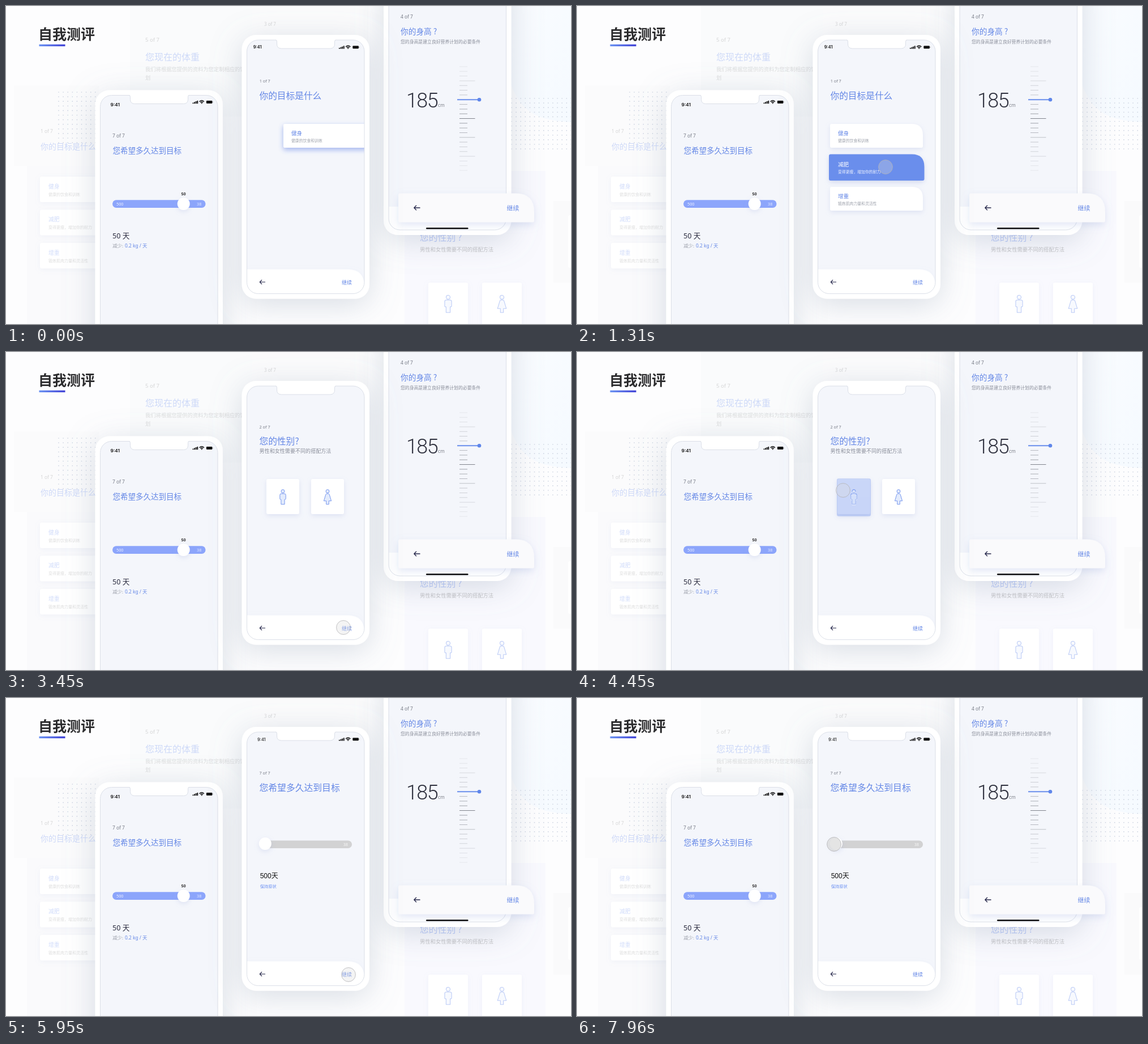
Recreate the animation shown at these times as an HTML page. Size 998 px wide and 561 px high, loop 8 s.

```html
<!DOCTYPE html>
<html lang="zh-CN">
<head>
<meta charset="utf-8">
<title>自我测评</title>
<style>
html, body { margin: 0; width: 100%; height: 100%; overflow: hidden; background: #fdfdfe; }
svg { display: block; width: 100vw; height: 100vh; }
text { font-family: "Noto Sans", "Noto Sans CJK SC", "Noto Sans CJK", sans-serif; white-space: pre; }
.cjk { font-family: "Noto Sans CJK SC", "Noto Sans CJK", "Noto Sans", sans-serif; font-weight: 300; }
.thin { font-weight: 300; }
.bar { font-family: Inter, sans-serif; }
.num { font-family: Roboto, sans-serif; font-weight: 300; }
.arial { font-family: "Liberation Sans", "Noto Sans CJK SC", "Noto Sans CJK", sans-serif; }
</style>
</head>
<body>
<svg id="stage" viewBox="0 0 998 561" preserveAspectRatio="none"></svg>
<script>
const LOOP = 8000;
const BLUE = '#6487e6', PICK = '#6a8eec', GREY = '#9ea2ac', DARK = '#2c2d40', PALE = '#f4f6fb', EDGE = '#d3d8e2';

// ---------- drawing helpers ----------
const txt = (x, cy, size, str, fill, cls = 'cjk', more = '') =>
  `<text class="${cls}" x="${x}" y="${cy + size * (cls === 'cjk' ? 0.38 : 0.36)}" font-size="${size}" fill="${fill}" ${more}>${str}</text>`;
const rect = (x, y, w, h, r, fill, more = '') =>
  `<rect x="${x}" y="${y}" width="${w}" height="${h}" rx="${r}" fill="${fill}" ${more}/>`;
const circle = (x, y, r, fill, more = '') =>
  `<circle cx="${x}" cy="${y}" r="${r}" fill="${fill}" ${more}/>`;
const line = (x1, x2, y, color, w, more = '') =>
  `<path d="M${x1} ${y}H${x2}" stroke="${color}" stroke-width="${w}" ${more}/>`;
const group = (body, more = '') => `<g ${more}>${body}</g>`;

// small corners with one large corner at top right
const leaf = (x, y, w, h, big, r = 3) =>
  `M${x + r} ${y}H${x + w - big}Q${x + w} ${y} ${x + w} ${y + big}V${y + h - r}` +
  `Q${x + w} ${y + h} ${x + w - r} ${y + h}H${x + r}Q${x} ${y + h} ${x} ${y + h - r}V${y + r}Q${x} ${y} ${x + r} ${y}Z`;

function dots(x, y, cols, rows) {
  let d = '';
  for (let j = 0; j < rows; j++)
    for (let i = 0; i < cols; i++) d += `M${(x + i * 8.1).toFixed(1)} ${(y + j * 8.1).toFixed(1)}h0`;
  return `<path d="${d}" stroke="#ccd3e0" stroke-width="1.7" stroke-linecap="round"/>`;
}

const arrow = (x, y, s = 1) =>
  `<path transform="translate(${x} ${y}) scale(${s})" d="M10 0H0.5M4 -3.8L0.3 0L4 3.8" fill="none" stroke="#25264a" stroke-width="1.2"/>`;

function signals(x, y) {
  let s = '';
  for (let i = 0; i < 4; i++) s += rect(x + i * 2.6, y + 1.2 - i * 1.2, 1.9, 1.8 + i * 1.2, 0.4, '#111');
  s += `<path d="M${x + 12} ${y - 0.6}q4.2 -3.8 8.4 0M${x + 13.8} ${y + 1}q2.4 -2.2 4.8 0" fill="none" stroke="#111" stroke-width="1.4"/>`;
  s += circle(x + 16.2, y + 2.2, 1, '#111');
  return s + rect(x + 24.3, y - 2.4, 10.6, 5, 1.2, '#111') + rect(x + 35.4, y - 0.8, 0.9, 1.8, 0.4, '#888');
}

function phone(x, y, h, body, id) {
  const nx = x + 62;
  return rect(x, y, 225.5, h, 25, '#fff', 'filter="url(#glow)"') +
    rect(x + 9, y + 9, 207.5, h - 18, 20, PALE) +
    group(body, `clip-path="url(#${id})"`) +
    rect(x + 9, y + 9, 207.5, h - 18, 20, 'none', `stroke="${EDGE}" stroke-width=".8"`) +
    `<path d="M${nx - 2} ${y + 8}q2 1 2 4v4q0 8 8 8h86q8 0 8 -8v-4q0 -3 2 -4z" fill="#fff"/>` +
    `<path d="M${nx - 2} ${y + 9}q2 0 2 3v4q0 8 8 8h86q8 0 8 -8v-4q0 -3 2 -3" fill="none" stroke="${EDGE}" stroke-width=".8"/>`;
}
const clip = (id, x, y, h) =>
  `<clipPath id="${id}">${rect(x + 9, y + 9, 207.5, h - 18, 20, '#fff')}</clipPath>`;
const shadow = (id, dy, dev, color, op) =>
  `<filter id="${id}" x="-50%" y="-50%" width="200%" height="200%"><feDropShadow dx="0" dy="${dy}" stdDeviation="${dev}" flood-color="${color}" flood-opacity="${op}"/></filter>`;

const HIS = 'M-3 -5.7H3Q5.2 -5.7 5.2 -3.4V3.2Q5.2 4.6 3.1 4.6V13H-3.1V4.6Q-5.2 4.6 -5.2 3.2V-3.4Q-5.2 -5.7 -3 -5.7Z';
const HER = 'M-1.6 -5.7H1.6Q2.8 -5.7 3.3 -4L6.6 7H2.3V13H-2.3V7H-6.6L-3.3 -4Q-2.8 -5.7 -1.6 -5.7Z';
const person = (x, y, body, color, tint, s = 1, more = '') =>
  group(circle(0, -10, 3, tint) + `<path d="${body}" fill="${tint}"/>`,
    `transform="translate(${x} ${y}) scale(${s})" stroke="${color}" stroke-width=".9" stroke-linejoin="round" ${more}`);

// ---------- goal cards ----------
const GOALS = [
  ['健身', '健康的饮食和训练', 208],
  ['减肥', '变得更瘦，增加你的耐力', 263.5],
  ['增重', '锻炼肌肉力量和灵活性', 319]
];
const label = (x, y, [a, b], c1, c2) => txt(x, y + 16, 9.6, a, c1) + txt(x, y + 29, 6.85, b, c2);

// ---------- backdrop ----------
function backdrop() {
  let s = rect(14, 140, 150, 142, 0, '#fbfbfc') + rect(37, 282, 250, 290, 0, '#fafafc') +
    rect(219, -5, 215, 200, 0, '#fafbfc') + rect(434, -5, 206, 90, 0, '#fbfbfc') +
    rect(704, 291, 249, 280, 0, '#f9f9fe') + rect(967, 344, 40, 144, 0, '#fafafb') + rect(993, 369, 20, 93, 3, '#fff');
  s += `<path d="M893 -5H1000V205Q940 203 918 180Q900 166 885 120Z" fill="url(#sky)"/>`;
  s += dots(93, 152, 9, 12) + dots(893, 163, 14, 12);
  let g = txt(61, 221, 8.4, '1 of 7', '#777', '') + txt(61, 248, 14, '你的目标是什么', '#5d83ee');
  g += txt(246, 60, 9.5, '5 of 7', '#777', '') + txt(246, 90, 16, '您现在的体重', '#5d83ee') +
    txt(246, 111, 9.3, '我们将根据您提供的资料为您定制相应的饮食计', '#888') + txt(246, 126, 9.3, '划', '#888');
  g += txt(456, 32, 8, '3 of 7', '#777', '');
  s += group(g, 'opacity=".28"');
  GOALS.forEach((c, i) => {
    const y = 301 + i * 58.5;
    s += `<path d="${leaf(60, y, 170, 45, 20)}" fill="#fff" filter="url(#faint)"/>` +
      group(txt(75, y + 17, 9.8, c[0], '#5d83ee') + txt(75, y + 31, 7, c[1], '#888'), 'opacity=".28"');
  });
  s += group(txt(731, 408, 15.8, '您的性别 ?', '#5d83ee') + txt(731, 429, 9.3, '男性和女性需要不同的搭配方法', '#777'), 'opacity=".42"');
  for (const x of [746, 841]) s += rect(x, 488, 70, 90, 3, '#fff', 'filter="url(#faint)"');
  s += person(781, 525.5, HIS, '#8fa9f0', '#f3f6fe', 1.17, 'opacity=".6"') + person(876, 525.5, HER, '#8fa9f0', '#f3f6fe', 1.17, 'opacity=".6"');
  return s;
}

const heading = () => txt(57, 49.8, 25, '自我测评', '#2b2b2d', 'cjk', 'style="font-weight:700"') +
  rect(58.5, 67.7, 46, 3.4, 0, 'url(#under)');

const knob = (x, y) => circle(x, y, 11, '#fff', 'filter="url(#soft)"');

function leftPhone() {
  return phone(157.5, 148.5, 470,
    txt(184.5, 173.7, 8.2, '9:41', '#111', 'bar', 'font-weight="600"') + signals(329.5, 169.3) +
    txt(188, 229.5, 8.3, '7 of 7', '#777b86', '') +
    txt(188.5, 255, 13.5, '您希望多久达到目标', BLUE) +
    rect(188, 342.3, 164.5, 13.6, 6.8, '#8ca5fb') +
    txt(195, 349, 7.3, '500', '#eef2ff', '') + txt(337, 349, 7.3, '38', '#dfe6ff', '') +
    knob(313.7, 349) + txt(309.4, 331, 7.2, '50', '#333', '', 'font-weight="600"') +
    txt(188, 405, 12.6, '50 天', DARK, 'thin') +
    txt(188, 423.3, 8.4, '减少:', GREY) + txt(210, 423.3, 8.4, '0.2 kg / 天', BLUE, ''), 'clipL');
}

function rightPhone() {
  let ticks = '';
  for (let i = 0; i < 23; i++) {
    if (i === 7) continue;
    const long = i % 4 === 3, k = Math.abs(i - 11) / 11;
    ticks += line(801, long ? 828.5 : 815, (107 + i * 8.32).toFixed(1), '#4a4d58', 0.8, `opacity="${(0.85 - 0.75 * Math.sqrt(k)).toFixed(2)}"`);
  }
  const inside = txt(697, 19.5, 8.3, '4 of 7', '#777b86', '') +
    txt(697, 45, 13.7, '你的身高 ?', BLUE) +
    txt(697, 62.7, 7.85, '您的身高是建立良好营养计划的必要条件', '#8a8e9a') +
    txt(707, 166, 36, '185', '#30323f', 'num', 'letter-spacing="-1.6"') + txt(763, 174.5, 8.4, 'cm', '#7d808a', 'thin') +
    ticks + line(797, 836, 165.2, PICK, 1.9) + circle(836, 165.2, 3.3, '#5f86ea') +
    `<path d="${leaf(675, 354, 208, 50, 28, 0)}" fill="#fff"/>`;
  return phone(667, -62, 466, inside, 'clipR') +
    `<path d="${leaf(693, 330.5, 240, 51, 33)}" fill="#fafafc" filter="url(#float)"/>` +
    rect(742, 391, 74.5, 2.5, 1.2, '#0b0b0d') +
    arrow(720.5, 356, 1.1) + txt(884.5, 356.5, 11, '继续', BLUE, 'cjk', 'style="font-weight:400"');
}

function midPhone() {
  let one = txt(436.7, 72.7, 7.4, '9:41', '#111', 'bar', 'font-weight="600"') + signals(588, 72.6) +
    txt(447.7, 132, 7.3, '1 of 7', '#777b86', '') + txt(447.5, 157.8, 15.7, '你的目标是什么', BLUE);
  GOALS.forEach((c, i) => {
    const d = leaf(447, c[2], 164, 42, 20);
    let card = `<path d="${d}" fill="#fff" filter="url(#lift)" id="lift${i}"/><path d="${d}" fill="#fff" filter="url(#soft)"/>` +
      label(461, c[2], c, BLUE, GREY);
    if (i === 1) card += group(`<path d="${leaf(445, 261.5, 168.5, 46.5, 22)}" fill="${PICK}" filter="url(#soft)"/>` +
      label(461, c[2], c, '#fff', '#f3f6ff'), 'id="goalOn" opacity="0"');
    one += group(card, `id="goal${i}"`);
  });
  const two = txt(447.5, 132, 7.3, '2 of 7', '#777b86', '') + txt(447.5, 157.5, 15.7, '您的性别?', BLUE) +
    txt(447.5, 174.5, 9.07, '男性和女性需要不同的搭配方法', '#8a8e9a') +
    rect(460, 224, 58, 62, 3, '#fff', 'filter="url(#soft)"') + rect(539, 224, 58, 62, 3, '#fff', 'filter="url(#soft)"') +
    person(489, 255.7, HIS, PICK, '#e3ebfc') + person(568, 255.7, HER, PICK, '#e3ebfc') +
    group(rect(459, 223.3, 60, 66.5, 3, PICK, 'filter="url(#soft)"') +
      person(489, 257, HIS, '#fff', '#b9caf7', 0.97), 'id="sexOn" opacity="0"');
  const three = txt(444, 73, 7.4, '9:41', '#222', 'bar', 'font-weight="500"') + signals(588, 72.6) +
    txt(447.5, 132, 7.3, '7 of 7', '#777b86', '') + txt(447.5, 157.8, 15.8, '您希望多久达到目标', BLUE) +
    rect(448, 251.6, 163, 13.4, 6.7, '#d2d2d3') + txt(596, 258.5, 6.8, '38', '#f7f7f7', '') +
    knob(457.8, 257) + txt(448.7, 314, 12, '500天', '#111', 'arial') + txt(448.7, 332.5, 7.25, '保持原状', '#6b90f2');
  const inside = group(one, 'id="s0"') + group(two, 'id="s1"') + group(three, 'id="s2"') +
    `<path d="${leaf(424, 464.5, 209, 50, 30, 0)}" fill="#fff" filter="url(#faint)"/>` +
    arrow(448, 487) + txt(593, 487.5, 9, '继续', BLUE, 'cjk', 'style="font-weight:400"');
  return phone(416.5, 51, 465.5, inside, 'clipM');
}

document.getElementById('stage').innerHTML = `<defs>
  ${shadow('glow', 10, 27, '#8292a8', 0.3)}${shadow('soft', 3, 4, '#8c9fd6', 0.22)}${shadow('lift', 4, 5, '#6d8df0', 0.5)}
  ${shadow('faint', 2, 5, '#9aa8cc', 0.1)}${shadow('float', 5, 7, '#8fa2da', 0.26)}
  ${clip('clipL', 157.5, 148.5, 470)}${clip('clipM', 416.5, 51, 465.5)}${clip('clipR', 667, -62, 466)}
  <linearGradient id="under"><stop stop-color="#6a92f2"/><stop offset="1" stop-color="#4243d6"/></linearGradient>
  <linearGradient id="sky" x2="1" y2="1"><stop stop-color="#fafcff"/><stop offset="1" stop-color="#f5faff"/></linearGradient>
  </defs>` + rect(0, 0, 998, 561, 0, '#fdfdfe') + backdrop() + heading() + leftPhone() + rightPhone() + midPhone() +
  circle(0, 0, 12.4, '#d9d9d9', 'id="touch" stroke="#b4b4b7" stroke-width=".8"');

// ---------- motion ----------
const $ = id => document.getElementById(id);
const ramp = (t, a, b) => Math.min(1, Math.max(0, (t - a) / (b - a)));

// active spans: start, end, number of steps; the picture rests between them
const SPANS = [[70, 350, 5], [620, 1310, 10], [2080, 2840, 11], [3040, 3800, 11], [3870, 4080, 4], [4450, 4580, 2],
  [4780, 5550, 12], [5620, 5950, 4], [6380, 7150, 12], [7220, 7490, 4], [7690, 7690, 1], [7890, 7960, 2]];
function snap(t) {
  let out = 0;
  for (const [a, b, n] of SPANS) {
    if (t < a) break;
    const step = n > 1 ? (b - a) / (n - 1) : 1;
    out = Math.min(b, a + Math.floor((t - a) / step + 1e-6) * step);
  }
  return out;
}

// touch path: start, end, ease power, from, bend, to
const MOVES = [
  [600, 1200, 2, 562, 114, 562, 200, 545, 284],
  [2060, 2840, 3, 545, 284, 560, 490, 596, 489],
  [2840, 3400, 1, 596, 489, 596, 487, 596, 486],
  [3430, 4080, 1.25, 596, 486, 557, 374, 470, 244],
  [4740, 5550, 1.4, 470, 244, 656, 488, 605, 488],
  [6340, 7150, 2, 605, 488, 500, 380, 451, 246],
  [7150, 7310, 1, 451, 246, 449, 256, 451, 264],
  [7310, 7490, 1.5, 451, 264, 453, 262, 454, 258]
];
function touchAt(t) {
  let m = MOVES[0];
  for (const k of MOVES) if (t >= k[0]) m = k;
  const u = 1 - Math.pow(1 - ramp(t, m[0], m[1]), m[2]), v = 1 - u;
  const mix = i => v * v * m[i] + 2 * u * v * m[i + 2] + u * u * m[i + 4];
  return [mix(3), mix(4)];
}

// slide-in start of each goal card
const ENTER = [-122, 5, 50];

function draw(time) {
  const t = snap(time);
  ENTER.forEach((start, i) => {
    const left = Math.pow(1 - ramp(t, start, start + 300), 3);
    $('goal' + i).setAttribute('transform', `translate(${(206 * left).toFixed(2)} 0)`);
    $('lift' + i).setAttribute('opacity', Math.min(1, left * 4.7).toFixed(3));
  });
  $('goalOn').setAttribute('opacity', ramp(t, 1140, 1300));
  $('sexOn').setAttribute('opacity', ramp(t, 4380, 4575));

  const a = ramp(t, 2980, 3320), b = ramp(t, 5550, 5900);
  [1 - a, a * (1 - b), b].forEach((o, i) => {
    $('s' + i).setAttribute('opacity', o.toFixed(3));
    $('s' + i).style.display = o ? '' : 'none';
  });

  const [x, y] = touchAt(t), el = $('touch');
  el.setAttribute('transform', `translate(${x.toFixed(2)} ${y.toFixed(2)})`);
  el.setAttribute('opacity', ramp(t, 560, 740).toFixed(3));
  el.setAttribute('fill-opacity', t >= 7690 ? 0.7 : 0.3);
}

const begin = performance.now();
function tick() {
  draw((performance.now() - begin) % LOOP);
  requestAnimationFrame(tick);
}
tick();
</script>
</body>
</html>
```
